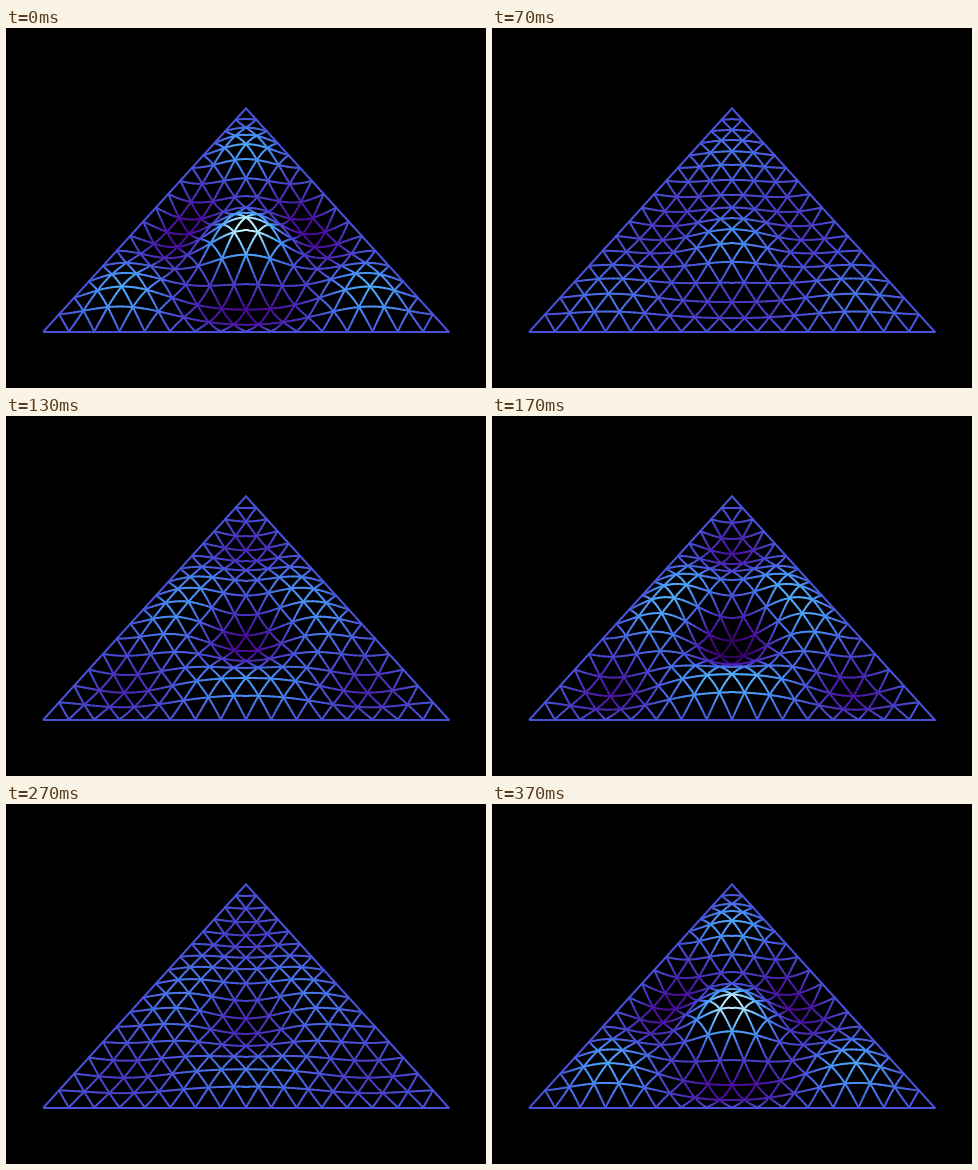
A matplotlib script that plays this animation: 480x360 px, repeating every 410 ms.

```python
import numpy as np
import matplotlib.pyplot as plt
from matplotlib.animation import FuncAnimation
from matplotlib.collections import LineCollection
from matplotlib.colors import LinearSegmentedColormap

W, H, DPI = 480, 360, 100
CELLS, SUB = 16, 5              # mesh cells per side, pieces per cell edge
TICKS, TICK_MS, STEPS = 41, 10, 12
PHASE = np.radians(9)
AMPLITUDE = 0.0314
PEAK = 1.5 * np.sqrt(3)         # largest value of the mode
ELEV, DIST = np.radians(45), 2.46
SCALE, FRONT = 405, -0.305
CX, CY = (W - 1) / 2, (H - 1) / 2

stops = [(0, (41, 1, 72)), (0.2, (73, 10, 152)), (0.5, (72, 82, 216)),
         (0.65, (71, 134, 244)), (0.77, (78, 168, 251)), (1, (208, 250, 254))]
deep_sea = LinearSegmentedColormap.from_list(
    "deep_sea", [(t, np.array(c) / 255) for t, c in stops], N=512)


def mesh_segments():
    """Barycentric end points of all short mesh pieces."""
    pieces = []
    for axis in range(3):
        for j in range(CELLS):
            fixed = j / CELLS
            s = np.linspace(0, 1 - fixed, (CELLS - j) * SUB + 1)
            line = np.stack([np.full_like(s, fixed), s, 1 - fixed - s], axis=-1)
            line = np.roll(line, axis, axis=1)
            pieces.append(np.stack([line[:-1], line[1:]], axis=1))
    return np.concatenate(pieces)


def mode(x, p):
    """Symmetric vibration mode of the equilateral triangle, zero on its edges."""
    return (np.sin(np.pi * p) * np.cos(6 * np.pi * x)
            + np.sin(4 * np.pi * p) * np.cos(4 * np.pi * x)
            - np.sin(5 * np.pi * p) * np.cos(2 * np.pi * x))


def project(x, y, z):
    depth = 1 + (y * np.cos(ELEV) - z * np.sin(ELEV)) / DIST
    up = FRONT + y * np.sin(ELEV) + z * np.cos(ELEV)
    return np.stack([CX + SCALE * x / depth, CY - SCALE * up / depth], axis=-1)


bary = mesh_segments()
bary = bary[np.argsort(-bary[:, :, 0].mean(axis=1), kind="stable")]  # back to front
X = (bary[..., 2] - bary[..., 1]) / 2
Y = bary[..., 0] * np.sqrt(3) / 2
SHAPE = mode(X, 1 - bary[..., 0])

fig = plt.figure(figsize=(W / DPI, H / DPI), dpi=DPI, facecolor="black")
ax = fig.add_axes([0, 0, 1, 1])
ax.set_xlim(-0.5, W - 0.5)
ax.set_ylim(H - 0.5, -0.5)
ax.axis("off")
wires = LineCollection([], linewidths=2 * 72 / DPI, capstyle="round")
ax.add_collection(wires, autolim=False)


def draw(tick):
    step = min(int((tick + 0.5) * 0.3), STEPS - 1)
    value = SHAPE * np.cos(2 * np.pi * step / STEPS + PHASE)
    wires.set_segments(project(X, Y, AMPLITUDE * value))
    wires.set_color(deep_sea(0.5 + value.mean(axis=1) / (2 * PEAK)))
    return [wires]


anim = FuncAnimation(fig, draw, frames=TICKS, interval=TICK_MS,
                     repeat=True, repeat_delay=0)
plt.show()
```
